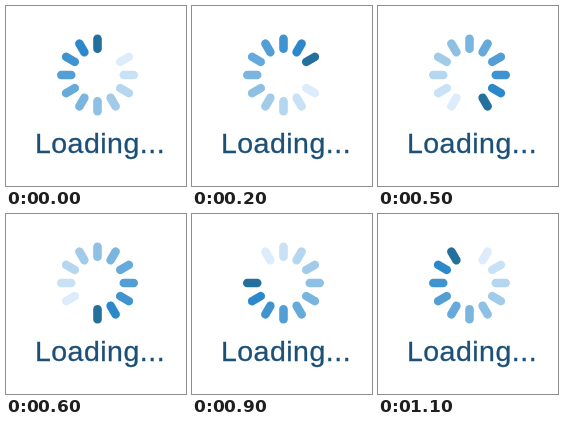
Recreate the animation shown at these times as an HTML page. Size 180 by 180 pixels, loop 1.2 s.

```html
<!DOCTYPE html>
<html lang="en">
<head>
<meta charset="utf-8">
<title>Loading</title>
<style>
  html, body { margin: 0; width: 100%; height: 100%; overflow: hidden; background: #fff; }
  svg { display: block; width: 100%; height: 100%; }
  line { stroke-width: 8.6; stroke-linecap: round; }
  text {
    font: 28.5px "Liberation Sans", Arial, sans-serif;
    letter-spacing: 0.5px;
    fill: #1c5077;
    stroke: #1c5077;
    stroke-width: 0.3;
  }
</style>
</head>
<body>
<svg viewBox="0 0 180 180">
  <g id="spinner" transform="translate(91.5 69)"></g>
  <text x="28.9" y="147">Loading...</text>
</svg>
<script>
  const SPOKES = 12;
  const STEP_MS = 100;
  const HEAD = "#24709d";
  const STRONG = [43, 137, 203];
  const PALE = [221, 236, 250];

  const spinner = document.getElementById("spinner");
  const spokes = Array.from({ length: SPOKES }, (_, i) => {
    const line = document.createElementNS("http://www.w3.org/2000/svg", "line");
    line.setAttribute("y1", -26.3);
    line.setAttribute("y2", -36.2);
    line.setAttribute("transform", `rotate(${i * 360 / SPOKES})`);
    return spinner.appendChild(line);
  });

  // The tail fades from strong to pale; the spoke ahead of the head is blank.
  function spokeColor(age) {
    if (age === 0) return HEAD;
    if (age === SPOKES - 1) return "none";
    const t = (age - 1) / (SPOKES - 3);
    return `rgb(${STRONG.map((c, i) => Math.round(c + (PALE[i] - c) * t))})`;
  }

  function render(ms) {
    const head = Math.floor(ms / STEP_MS) % SPOKES;
    spokes.forEach((spoke, i) =>
      spoke.setAttribute("stroke", spokeColor((head - i + SPOKES) % SPOKES)));
  }

  const start = performance.now();
  function tick() {
    render(performance.now() - start);
    requestAnimationFrame(tick);
  }
  tick();
</script>
</body>
</html>
```
